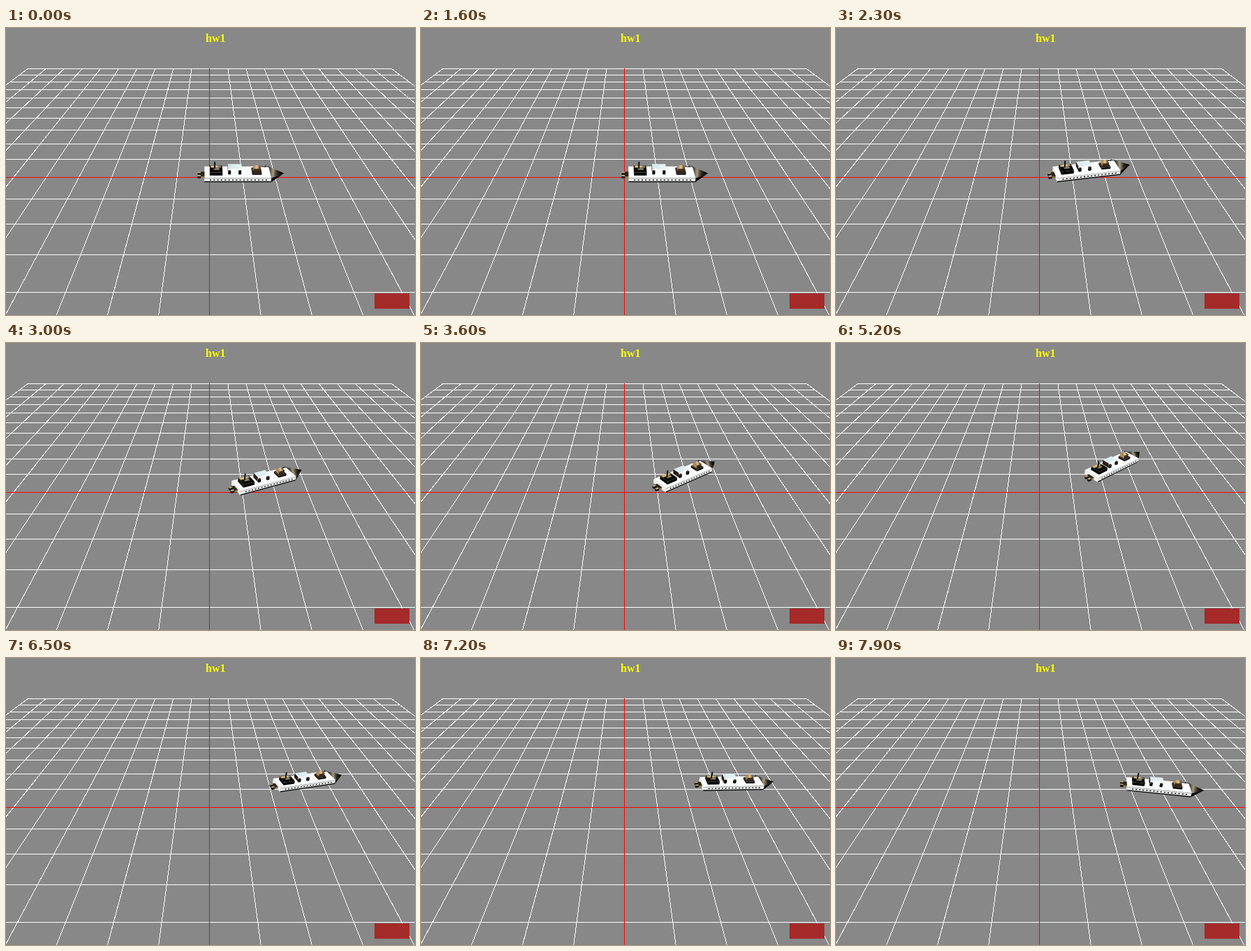
An HTML page with a canvas for the animation above (8 s loop, 586x412 px).

```html
<!DOCTYPE html>
<html lang="en">
<head>
<meta charset="utf-8">
<title>Ship on a grid</title>
<style>
  html, body { margin: 0; width: 100%; height: 100%; overflow: hidden; background: #888; }
  svg, canvas { position: absolute; left: 0; top: 0; }
  path { fill: none; stroke-width: 1; shape-rendering: crispEdges; }
  text { font: bold 16px "Liberation Serif", "Times New Roman", serif; fill: #ff0; text-anchor: middle; }
</style>
</head>
<body>
<svg width="586" height="412">
  <path id="grid" stroke="#fff"/>
  <path id="axes" stroke="#f00"/>
  <text x="300.3" y="20">hw1</text>
  <rect x="528" y="381" width="50" height="22" fill="#a52a2a"/>
</svg>
<canvas id="stage" width="586" height="412"></canvas>
<script>
const ctx = document.getElementById('stage').getContext('2d');

// Camera 10 units from the origin, 6 up and 8 back; z grows away from the viewer.
const FOCAL = 468.7;

function project(x, z, h = 0) {
  const depth = 10 + 0.8 * z - 0.6 * h;
  return [291.9 + FOCAL * x / depth, 214.5 - FOCAL * (0.6 * z + 0.8 * h) / depth];
}

function gridLine(x0, z0, x1, z1) {
  return `M${project(x0, z0).join(' ')}L${project(x1, z1).join(' ')}`;
}

function buildGrid() {
  let lines = '';
  for (let i = -10; i <= 10; i++) {
    if (i) lines += gridLine(i, -9, i, 10) + gridLine(-10, i, 10, i);
  }
  grid.setAttribute('d', lines);
  axes.setAttribute('d', gridLine(0, -9, 0, 10) + gridLine(-10, 0, 10, 0));
}

// The ship speeds up, steers left, then steers right at the same rate.
const SPEED = 0.0495, RAMP = 13, TURN = 0.0315, TURN_START = 13, TURN_BACK = 41;

function heading(step) {
  if (step < TURN_START) return 0;
  return TURN * (TURN_BACK - TURN_START - Math.abs(step - TURN_BACK));
}

function poseAt(step) {
  let x = 0, z = 0;
  for (let i = 0; i < step; i++) {
    const distance = SPEED * Math.min(1, (i + 0.5) / RAMP);
    const angle = heading(i + 0.5);
    x += distance * Math.cos(angle);
    z += distance * Math.sin(angle);
  }
  return { x, z, angle: heading(step) };
}

function drawShip({ x, z, angle }) {
  const cos = Math.cos(angle), sin = Math.sin(angle);
  // u runs forward, s to starboard, h up
  const at = ([u, s, h]) => project(x + u * cos + s * sin, z + u * sin - s * cos, h);

  function face(color, ...corners) {
    const p = corners.map(at);
    const [a, b, c] = p;
    if ((b[0] - a[0]) * (c[1] - b[1]) - (b[1] - a[1]) * (c[0] - b[0]) <= 0) return;
    ctx.fillStyle = color;
    ctx.beginPath();
    p.forEach(q => ctx.lineTo(...q));
    ctx.closePath();
    ctx.fill();
  }

  function panel(color, [u0, u1], [s0, s1], h) {
    face(color, [u0, s0, h], [u1, s0, h], [u1, s1, h], [u0, s1, h]);
  }

  function sidePanel(color, [u0, u1], s, [h0, h1]) {
    face(color, [u0, s, h1], [u1, s, h1], [u1, s, h0], [u0, s, h0]);
  }

  function box([u0, u1], [s0, s1], [h0, h1], top, side, aft, fore = aft) {
    face(aft, [u0, s0, h1], [u0, s1, h1], [u0, s1, h0], [u0, s0, h0]);
    face(fore, [u1, s1, h1], [u1, s0, h1], [u1, s0, h0], [u1, s1, h0]);
    sidePanel(side, [u0, u1], s1, [h0, h1]);
    panel(top, [u0, u1], [s0, s1], h1);
  }

  function gradient(from, to, ...colors) {
    const g = ctx.createLinearGradient(...at(from), ...at(to));
    colors.forEach((color, i) => g.addColorStop(i / (colors.length - 1), color));
    return g;
  }

  function pole(color, width, from, to) {
    ctx.strokeStyle = color;
    ctx.lineWidth = width;
    ctx.beginPath();
    ctx.moveTo(...at(from));
    ctx.lineTo(...at(to));
    ctx.stroke();
  }

  // hull
  const deck = 0.2, keel = 0.04, beam = [-0.3, 0.3], length = [-0.16, 1.82];
  box(length, beam, [keel, deck], '#fbfdfd', '#eceeed', '#f0f0ec', '#333');
  sidePanel('#777', length, 0.3, [0.188, 0.2]);
  sidePanel('#000', length, 0.3, [keel, 0.08]);
  for (let u = 0; u < 1.75; u += 0.11) sidePanel('#111', [u, u + 0.045], 0.3, [0.11, 0.15]);

  // bow
  const tip = [2.25, 0, 0.16];
  face('#080808', [1.82, 0.3, deck], tip, [1.82, 0.3, keel]);
  face(gradient([1.8, 0, deck], tip, '#4a463c', '#a39a80', '#39342a', '#0c0b08', '#000'),
    [1.82, -0.3, deck], tip, [1.82, 0.3, deck]);
  pole('#222', 1, [1.7, -0.25, deck], [1.72, -0.25, 0.28]);
  pole('#222', 1, [1.55, -0.29, deck], [1.84, -0.29, deck]);

  // wheelhouse
  box([1.27, 1.55], [-0.14, 0.14], [deck, 0.27], '#2a2117', '#0c0a08', '#16110c');
  box([1.31, 1.51], [-0.12, 0.07], [0.27, 0.37],
    gradient([1.31, 0, 0.37], [1.51, 0, 0.37], '#a5875c', '#e6c48e', '#4d3b26'), '#3c2d1c', '#b08a55', '#251c12');

  // middle block
  box([0.55, 0.96], [-0.2, 0.06], [deck, 0.36],
    gradient([0.55, 0, 0.36], [0.96, 0, 0.36], '#d5e9ec', '#e9f5f7'), '#f8fbfb', '#2a1a12', '#ccc');
  for (const u of [0.55, 0.86]) {
    box([u, u + 0.08], [0.06, 0.12], [deck, 0.31], '#2e2119', '#000', '#000');
  }

  // rear cabin
  box([0, 0.38], [-0.19, 0.17], [deck, 0.31], '#0b0a08', '#000', '#050505');
  panel(gradient([0.02, 0, 0.31], [0.36, 0, 0.31], '#e0b45c', '#d9cda6', '#5a4c32'), [0.03, 0.36], [-0.19, -0.08], 0.31);
  panel('#8a8064', [0.12, 0.29], [-0.08, 0.04], 0.31);
  pole('#111', 2, [0.15, -0.04, 0.3], [0.15, -0.04, 0.55]);

  // stern gear
  box([-0.28, -0.16], [-0.12, 0.12], [0.07, 0.13], '#2b2618', '#8f7a45', '#16130c');
  box([-0.37, -0.27], [-0.09, -0.02], [0.07, 0.15], '#b9a26a', '#000', '#1a1710');
  box([-0.37, -0.27], [0.04, 0.11], [0.05, 0.13], '#c9b27a', '#111', '#1a1710');
}

function render(now) {
  const step = Math.max(0, Math.floor((now % 8000 - 400) / 100));
  ctx.clearRect(0, 0, 586, 412);
  drawShip(poseAt(step));
  requestAnimationFrame(render);
}

buildGrid();
render(performance.now());
</script>
</body>
</html>
```
